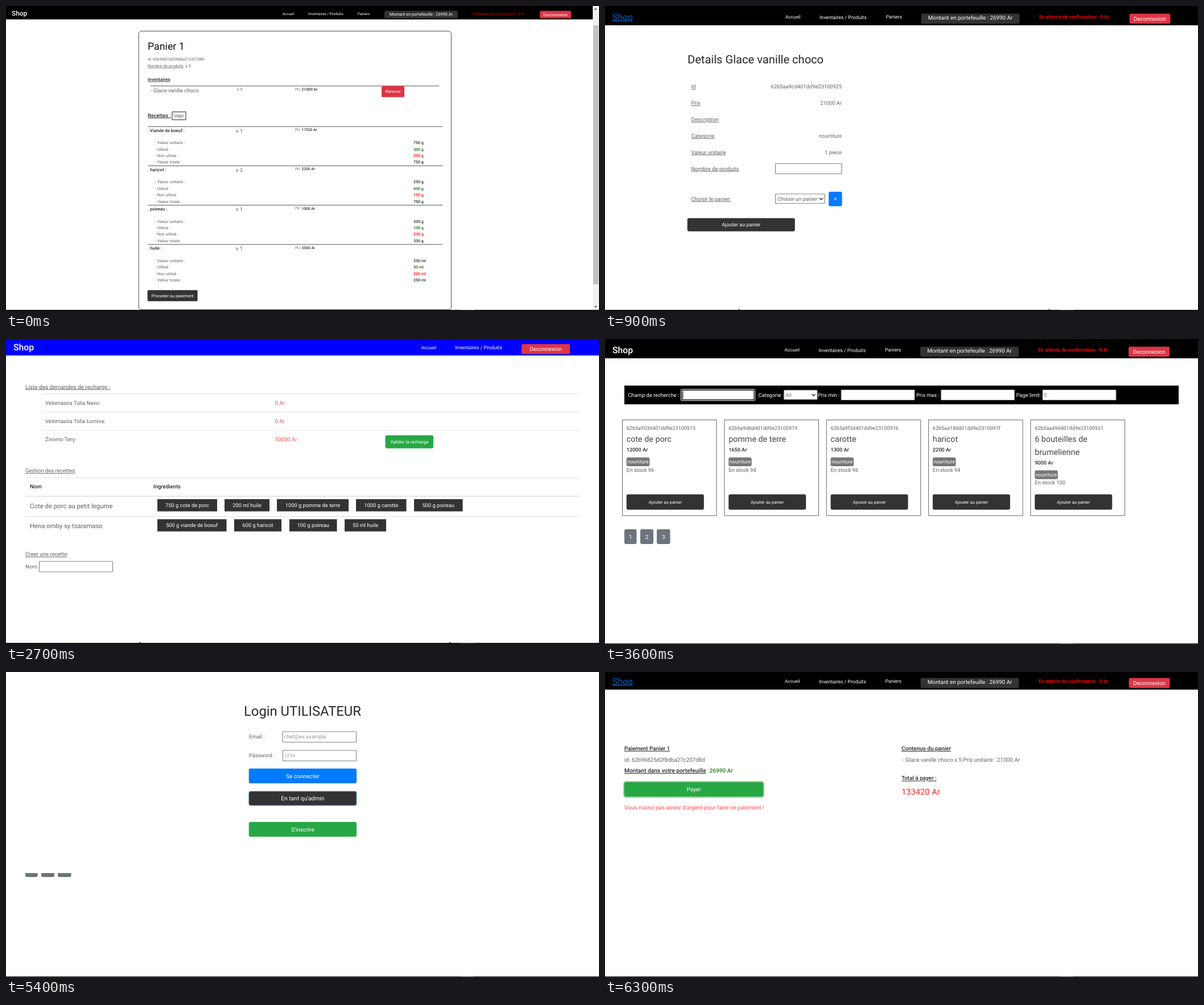
Recreate the animation shown at these times as an HTML page. Size 1042 px wide and 537 px high, loop 7.2 s.

```html
<!DOCTYPE html>
<html lang="fr">
<head>
<meta charset="utf-8">
<title>Shop</title>
<style>
  html, body { margin: 0; width: 100%; height: 100%; overflow: hidden; background: #fff; }
  svg { display: block; width: 1042px; height: 537px; }
  text { font-family: Roboto, "Open Sans", sans-serif; text-rendering: geometricPrecision; white-space: pre; }
  .u { text-decoration: underline; }
  .m { text-anchor: middle; }
  .e { text-anchor: end; }
  .s { font-weight: 500; }
  .b { font-weight: 700; }
</style>
</head>
<body>
<svg id="stage" viewBox="0 0 1042 537"></svg>
<script>
const INK = "#24282c", GREY = "#606060", DARK = "#333", RED = "#dc3545", ERROR = "#ff4a50",
      BLUE = "#007bff", GREEN = "#28a745", LINE = "#dee2e6";

// y is the middle of the capitals; cls combines the one-letter classes above
function text(x, y, content, size = 9.5, fill = GREY, cls = "") {
  return `<text x="${x}" y="${y + size * 0.35}" font-size="${size}" fill="${fill}" class="${cls}">${content}</text>`;
}
function box(x, y, w, h, fill, radius = 0, stroke = "none", width = 1) {
  return `<rect x="${x}" y="${y}" width="${w}" height="${h}" rx="${radius}" fill="${fill}" stroke="${stroke}" stroke-width="${width}"/>`;
}
function button(x, y, w, h, label, size, fill, radius = 3, stroke) {
  return box(x, y, w, h, fill, radius, stroke) + text(x + w / 2, y + h / 2, label, size, "#fff", "m");
}
const rule = (x, y, w, fill = LINE, h = 1) => box(x, y, w, h, fill);
const input = (x, y, w, h = 19) => box(x + .5, y + .5, w - 1, h - 1, "#fff", 1, "#858585", 1.2);
const chevron = (x, y) =>
  `<path d="M${x - 3} ${y - 1.5}l3 3l3-3" fill="none" stroke="#222" stroke-width="1.4"/>`;

// Screen edge below the page
function bottomEdge(thick) {
  const y = thick ? 535 : 536;
  return rule(0, y, 1042, "#111", 537 - y) + rule(800, y, 23, "#444", 1);
}
const cornerMarks = rule(234, 534, 3, "#444") + rule(779, 534, 3, "#444");

function userNav(height, dx, linked) {
  const y = height - 14.5;
  return rule(0, 0, 1042, "#000", height) +
    text(13, y - .5, "Shop", 15.8, linked ? "#0a58b8" : "#fff", linked ? "u" : "s") +
    text(317 + dx, y, "Accueil", 8.1, "#fff") +
    text(377 + dx, y, "Inventaires / Produits", 8.7, "#fff") +
    text(493.5 + dx, y, "Paniers", 8.5, "#fff") +
    box(555.5 + dx, y - 6, 173, 17.5, DARK, 3) +
    text(642 + dx, y + 1, "Montant en portefeuille : 26990 Ar", 9.8, "#fff", "m") +
    text(763 + dx, y, "En attente de confirmation : 0 Ar", 8.45, "#f00", "b") +
    button(921.5 + dx, y - 6, 72, 17.5, "Deconnexion", 9.9, RED);
}

function cartPage() {
  const nav = rule(0, 0, 1031, "#000", 23.6) +
    text(10, 12.5, "Shop", 11.8, "#fff", "s") +
    text(486, 13.5, "Accueil", 6.2, "#fff") +
    text(531, 13.5, "Inventaires / Produits", 6.5, "#fff") +
    text(618, 13.5, "Paniers", 6.3, "#fff") +
    box(665, 8.5, 129, 13, DARK, 3) +
    text(729.5, 14, "Montant en portefeuille : 26990 Ar", 7.33, "#fff", "m") +
    text(820, 13.5, "En attente de confirmation : 0 Ar", 6.4, "#e00000") +
    button(938, 8.5, 55, 13, "Deconnexion", 7.45, RED, 2);
  const scrollbar = rule(1031, 0, 11, "#f1f1f1", 535) + rule(1032, 34, 9, "#c1c1c1", 456) +
    `<path d="M1033.5 6.5h5l-2.5-3zM1033.5 528h5l-2.5 3z" fill="#505050"/>`;
  const recipe = (y, name, count, price, unit, used, unused, total) =>
    rule(249, y - .5, 518, "#555") +
    text(249, y + 6.5, `. ${name} :`, 7.8, INK, "s") +
    text(404, y + 7.5, `x ${count}`, 9) +
    text(508, y + 5.5, "PU:", 6.5) + text(519.5, y + 5.5, price + " Ar", 6.6, INK, "s") +
    [["Valeur unitaire", unit, INK], ["Utilisé", used, "#146414"],
     ["Non utilisé", unused, "#f00"], ["Valeur totale", total, INK]].map(([label, value, color], i) =>
      text(262, y + 28.5 + i * 11.4, `- ${label} :`, 7.1) +
      text(716, y + 28.5 + i * 11.4, value, 7.1, color, "s")).join("");
  return nav + scrollbar +
    box(233.2, 44.2, 549.2, 490.6, "#fff", 5, "#444") +
    text(249, 71, "Panier 1", 17.8, "#111") +
    text(249, 94, "id: 62b96825d2f8dba27c207d8d", 6.85) +
    text(249, 105.3, "Nombre de produits", 7.1, GREY, "u") + text(312, 105.3, ": x 5", 7.1) +
    text(249, 129, "Inventaires", 8, INK, "u s") + text(288.5, 129, ":", 7) +
    rule(254, 140.3, 507, "#555") +
    text(254, 148.5, "- Glace vanille choco", 9.3) +
    text(406, 146.5, "x 5", 7.3) +
    text(508, 146.5, "PU:", 6.5) + text(519.5, 146.5, "21000 Ar", 6.8, INK, "s") +
    button(660, 141, 40, 19.5, "Remove", 7.5, RED, 2) +
    text(249, 192.5, "Recettes :", 9.2, INK, "u s") +
    box(292, 186.3, 24, 14, "#efefef", 0, "#333") + text(304, 193.3, "Vider", 7, GREY, "m") +
    recipe(212.3, "Viande de boeuf", 1, 17320, "750 g", "500 g", "250 g", "750 g") +
    recipe(281.4, "haricot", 3, 2200, "250 g", "600 g", "150 g", "750 g") +
    recipe(350.7, "poireau", 1, 1000, "330 g", "100 g", "230 g", "330 g") +
    recipe(419.8, "huile", 1, 3500, "250 ml", "50 ml", "200 ml", "250 ml") +
    button(248.6, 500.2, 88, 19.6, "Proceder au paiement", 7.6, DARK, 2) +
    bottomEdge(true);
}

function detailsPage(navHeight, title, rows, extra, shift, action) {
  return userNav(navHeight, 0, true) +
    text(145, 94, `Details ${title}`, 20.1, INK) +
    rows.map(([label, value], i) =>
      text(151.5, 142 + i * 28.85, label, 9.5, GREY, "u") +
      text(416, 142 + i * 28.85, value, 9.3, GREY, "e")).join("") +
    extra +
    text(151.5, 292 + shift, "Choisir le panier:", 9.4, GREY, "u") +
    input(299, 283 + shift, 87.5, 17.5) + text(303, 292 + shift, "Choisir un panier", 9.4) +
    chevron(380, 292 + shift) +
    button(393, 279.5 + shift, 23.5, 25.5, "+", 9.5, BLUE) +
    button(144.7, 326 + shift, 189, 23.3, action, 9, DARK) +
    cornerMarks + bottomEdge(true);
}

function productDetails() {
  return detailsPage(34, "Glace vanille choco", [
    ["Id", "62b5aa9cd401dd9e23100925"], ["Prix", "21000 Ar"], ["Description", ""],
    ["Categorie", "nourriture"], ["Valeur unitaire", "1 piece"], ["Nombre de produits", ""]],
    input(299, 277, 117.5), 47.5, "Ajouter au panier");
}

function recipeDetails() {
  const chips = [[244, 63.5, "500g viande de boeuf"], [308.5, 37.5, "600g haricot"],
                 [347, 38, "100g poireau"], [386, 30.5, "50ml huile"]]
    .map(([x, w, label]) => box(x, 224, w, 11.5, "#777", 3) +
      text(x + w / 2, 229.7, label, 6.3, "#fff", "m b")).join("");
  return detailsPage(32.7, "Hena omby sy tsaramaso", [
    ["Id", "62b587de3f14f8a8bf78f591"], ["Prix", "100000 Ar"], ["Description", ""],
    ["Liste d'ingredients", ""], ["Valeur unitaire", "1 piece"]],
    chips, 0, "Ajouter la recette au panier");
}

function adminPage() {
  const requests = [["Velomasira Tolia Navo", 0], ["Velomasira Tolia Lomiva", 0], ["Zivomo Tery", 50000]]
    .map(([name, amount], i) => rule(62, 96 + i * 32.3, 946) +
      text(69, 112.3 + i * 32.3, name + ":", 9.5) +
      text(472.5, 112.3 + i * 32.3, amount + " Ar", 9.6, ERROR)).join("");
  const chips = (y, list) => list.map(([x, w, label]) =>
    button(x, y, w, 21.5, label, 9.3, DARK, 0)).join("");
  return rule(0, 0, 1042, "#00f", 29) +
    text(13, 14, "Shop", 15.8, "#fff", "s") +
    text(729.5, 15, "Accueil", 8.1, "#fff") +
    text(789, 15, "Inventaires / Produits", 8.7, "#fff") +
    button(906, 9, 85, 17.5, "Deconnexion", 9.9, RED) +
    text(34, 84, "Liste des demandes de recharge :", 10, GREY, "u") + requests +
    button(666.5, 169.5, 84.5, 23, "Valider la recharge", 8.1, GREEN) +
    text(34, 232, "Gestion des recettes", 9.5, GREY, "u") + text(120.5, 232, ":") +
    rule(34, 244, 974) + rule(34, 276, 974, LINE, 1.6) + rule(34, 312, 974) +
    text(42, 260, "Nom", 9.6, INK, "s") + text(259, 260, "Ingredients", 9.5, INK, "s") +
    text(42, 294.5, "Cote de porc au petit legume", 11.4) +
    chips(282, [[266, 105, "750 g cote de porc"], [384, 79, "200 ml huile"],
      [476, 126, "1000 g pomme de terre"], [615, 88.5, "1000 g carotte"], [717, 85.5, "500 g poireau"]]) +
    text(42, 329.5, "Hena omby sy tsaramaso", 11.3) +
    chips(317.3, [[266, 121.5, "500 g viande de boeuf"], [401, 83, "600 g haricot"],
      [498, 83.5, "100 g poireau"], [595, 73, "50 ml huile"]]) +
    text(34, 379, "Creer une recette", 9.6, GREY, "u") + text(107, 379, ":") +
    text(34, 400.5, "Nom:", 9.3) + input(58, 391, 130, 19.5) +
    cornerMarks + bottomEdge(true);
}

const pager = [[34, 21.5], [62, 23], [91, 23.5]]
  .map(([x, w], i) => button(x, 335, w, 26, i + 1, 10, "#6c757d", 3)).join("");

function shopPage() {
  const field = (x, label) => text(x, 98.5, label, 9.3, "#fff");
  const cards = [
    ["62b5a953d401dd9e23100913", ["cote de porc"], 12000, 96],
    ["62b5a9dbd401dd9e23100919", ["pomme de terre"], 1650, 98],
    ["62b5a9f3d401dd9e2310091b", ["carotte"], 1300, 96],
    ["62b5aa18d401dd9e2310091f", ["haricot"], 2200, 94],
    ["62b5aa49d401dd9e23100921", ["6 bouteilles de", "brumelienne"], 9000, 100],
  ].map(([id, name, price, stock], i) => {
    const left = 30.5 + i * 179.35, x = left + 7.3, y = (name.length - 1) * 22.7;
    return box(left, 142.5, 165.5, 168.5, "#fff", 0, "#666") +
      text(x, 157, id, 9) +
      name.map((line, k) => text(x, 176 + k * 22.7, line, 14.3, "#444")).join("") +
      text(x, 195 + y, price + " Ar", 9.1, INK, "s") +
      button(x, 208.5 + y, 40.5, 15.5, "nourriture", 8.6, "#777") +
      text(x, 230.3 + y, `En stock ${stock}`, 9.4) +
      button(x, 273.5, 136, 27, "Ajouter au panier", 7.7, DARK);
  }).join("");
  return userNav(34, -1.5, false) +
    rule(34, 82, 974, "#000", 33) +
    field(40.5, "Champ de recherche :") + field(269.5, "Categorie :") + field(374, "Prix min :") +
    field(547, "Prix max :") + field(722.5, "Page limit:") +
    box(133.5, 88.5, 130, 20, "#000", 1, "#fff") + rule(135.5, 90.5, 126, "#fff", 16) +
    rule(136.5, 92, 1, "#222", 13) +
    input(314, 89.5, 59.5, 17.5) + text(317, 98.5, "All", 9.4, "#777") + chevron(366.5, 98.5) +
    input(414.5, 89, 130) + input(590, 89, 130) + input(768.5, 89, 130) +
    text(771, 98.5, "5", 9.4, "#777") +
    cards + pager + bottomEdge(false);
}

function loginPage(role, other, footer) {
  return pager + rule(0, 0, 1042, "#fff", 354) +
    text(521, 69, `Login ${role}`, 23.8, INK, "m") +
    text(427, 114, "Email :", 9.3) + input(485.7, 104.5, 130.3, 19.5) +
    text(488.5, 114, "chef@ex.example", 9.4, "#999") +
    text(427, 147, "Password :", 9.2) + input(485.7, 137.5, 130.3, 19.5) +
    text(488.5, 147, "1234", 8.6, "#999") +
    button(426.7, 170, 189.3, 26, "Se connecter", 10.1, BLUE) +
    button(427, 210.2, 188.7, 24.6, other, 10.3, DARK, 3, "#1765b8") +
    footer + bottomEdge(false);
}

const adminLogin = () => loginPage("ADMIN", "En tant qu'utilisateur",
  text(427, 256, "Email and password don't match", 9.45, ERROR));
const userLogin = () => loginPage("UTILISATEUR", "En tant qu'admin",
  button(426.7, 264, 189.3, 26, "S'inscrire", 10.1, GREEN));

function paymentPage() {
  return userNav(31, -1, true) +
    text(34, 134.5, "Paiement Panier 1", 9.75, INK, "u s") +
    text(34, 154.5, "id: 62b96825d2f8dba27c207d8d", 9.75) +
    text(34, 173.5, "Montant dans votre portefeuille", 10.2, INK, "u s") +
    text(181, 173.5, ":", 10, INK) + text(183.7, 173.5, "26990 Ar", 10, "#1c7c1c", "s") +
    box(33, 193, 246, 27.5, "none", 4, "#93d3a2", 2) +
    button(34, 194, 244, 25.5, "Payer", 9.9, GREEN) +
    text(34, 238.5, "Vous n'avez pas assez d'argent pour faire ce paiement !", 10.05, ERROR) +
    text(521, 134.5, "Contenus du panier", 10, INK, "u s") +
    text(522.5, 155, "- Glace vanille choco", 9.8) + text(614, 155, "x 5", 9.8) +
    text(629, 155, "Prix unitaire : 21000 Ar", 9.95) +
    text(521, 187, "Total à payer :", 9.9, INK, "u s") +
    text(521, 211, "133420 Ar", 14.7, "#f52a2a") +
    bottomEdge(false);
}

const PAGE_MS = 900;
const pages = [cartPage, productDetails, recipeDetails, adminPage, shopPage, adminLogin, userLogin, paymentPage];
const stage = document.getElementById("stage");
stage.innerHTML = pages.map(page => `<g display="none">${page()}</g>`).join("");

const start = performance.now();
let shown = -1;
function tick() {
  const current = Math.floor((performance.now() - start) / PAGE_MS) % pages.length;
  if (current !== shown) {
    [...stage.children].forEach((group, i) => group.setAttribute("display", i === current ? "inline" : "none"));
    shown = current;
  }
  requestAnimationFrame(tick);
}
tick();
</script>
</body>
</html>
```
